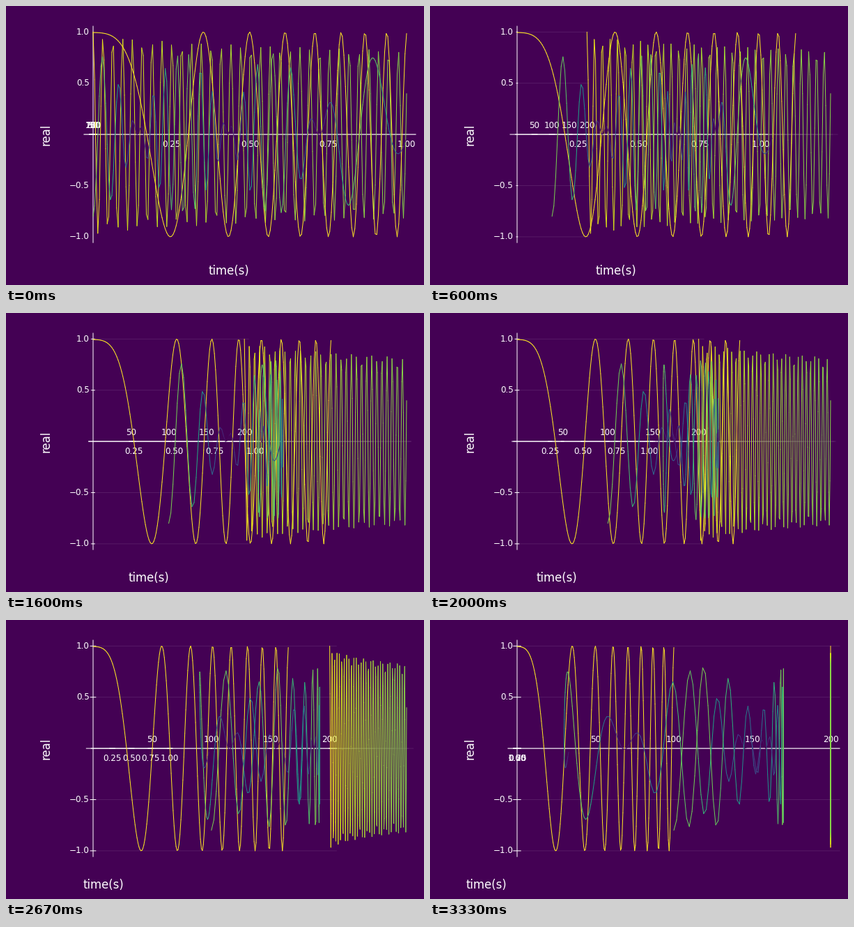
Recreate the animation shown at these times as a matplotlib script. Size 600 by 400 pixels, loop 3390 ms.

```python
import numpy as np
import matplotlib.pyplot as plt
from matplotlib.animation import FuncAnimation
from matplotlib.collections import LineCollection

W, H, DPI = 600, 400, 100
FRAMES, LOOP = 51, 3390
BG = "#440154"
X0, Y0 = 125, 184.1            # screen position of the origin
SPAN, RISE = 450, 146.8        # pixels per unit across and up
LO, HI = -0.03, 1.03           # widened limits of time and frequency
TICK = 0.0127                  # half length of a tick mark
FMAX = 200
PT = 72 / DPI
SMALL, LARGE = 12, 16.5        # text sizes in pixels

times = np.array([0.25, 0.5, 0.75, 1.0])
freqs = np.array([50, 100, 150, 200])
reals = np.array([-1.0, -0.5, 0.5, 1.0])

# AM-FM components: amplitude, angular frequency, phase
t = np.linspace(0, 1, 201)
components = [
    (np.exp(-0.2 * np.sqrt(t)), 200 + 0 * t, 200 * t),
    (1 + 0 * t, 100 * t, 50 * t**2 + 0.1),
    (0.8 * np.cos(10.95 * t), 100 + 70 * np.sin(5 * t),
     100 * t + 14 * (1 - np.cos(5 * t)) + np.pi),
]

fig = plt.figure(figsize=(W / DPI, H / DPI), dpi=DPI, facecolor=BG)
ax = fig.add_axes([0, 0, 1, 1])
ax.set(xlim=(0, W), ylim=(H, 0))
ax.axis("off")


def strokes(z, **kw):
    lines = LineCollection([], linewidths=PT, zorder=z, **kw)
    lines.set_snap(False)
    return ax.add_collection(lines, autolim=False)


def label(s, x, y, px, ha="center", **kw):
    return ax.text(x, y, s, color="white", fontsize=px * PT, zorder=3,
                   family="DejaVu Sans", ha=ha, va="center", **kw)


grid = strokes(1, colors=[(1, 1, 1, 0.1)])
axes = strokes(2, colors="white")
curves = []
for i, (amp, _, _) in enumerate(components):
    curve = strokes(4 + i, cmap="viridis", capstyle="round")
    curve.set_array(np.abs(amp[:-1]))
    curve.set_clim(0, 1)
    curves.append(curve)

time_labels = [label(f"{v:.2f}", 0, 198.8, SMALL) for v in times]
freq_labels = [label(str(v), 0, 171.3, SMALL) for v in freqs]
for v in reals:
    label(f"{v:.1f}".replace("-", "\u2212"), 119.5, Y0 - RISE * v, SMALL,
          ha="right")
label("real", 58, Y0, LARGE, rotation=90)
time_title = label("time(s)", 0, 380, LARGE)


def update(k):
    # the camera turns in whole degrees
    angle = np.radians(round(90 * k / (FRAMES - 1)))
    c, s = np.cos(angle), np.sin(angle)

    def project(tt, ff, zz=0):
        x = X0 + SPAN * (np.asarray(tt) * c + np.asarray(ff) * s) / (c + s)
        return np.stack(np.broadcast_arrays(x, Y0 - RISE * np.asarray(zz)), -1)

    def along_freq(tt, lo, hi, z=0):
        return project([tt, tt], [lo, hi], z)

    def along_time(ff, lo, hi):
        return project([lo, hi], [ff, ff])

    def rulings(lo, hi):
        return ([along_freq(v, lo, hi) for v in times]
                + [along_time(v / FMAX, lo, hi) for v in freqs]
                + [along_freq(0, lo, hi, v) for v in reals])

    grid.set_segments(rulings(LO, HI))
    axes.set_segments([along_time(0, LO, HI), along_freq(0, LO, HI),
                       project([0, 0], [0, 0], [-1.06, 1.06])]
                      + rulings(-TICK, TICK))

    for curve, (amp, omega, phase) in zip(curves, components):
        p = project(t, omega / FMAX, amp * np.cos(phase))
        curve.set_segments(np.stack([p[:-1], p[1:]], 1))

    for text, v in zip(time_labels, times):
        text.set_x(project(v, 0)[0])
    for text, v in zip(freq_labels, freqs):
        text.set_x(project(0, v / FMAX)[0])
    time_title.set_x(project(0.5, LO)[0] - 30.3)
    return [grid, axes, *curves, *time_labels, *freq_labels, time_title]


anim = FuncAnimation(fig, update, frames=FRAMES, interval=LOOP / FRAMES,
                     init_func=lambda: update(0), repeat=True, repeat_delay=0)
plt.show()
```
